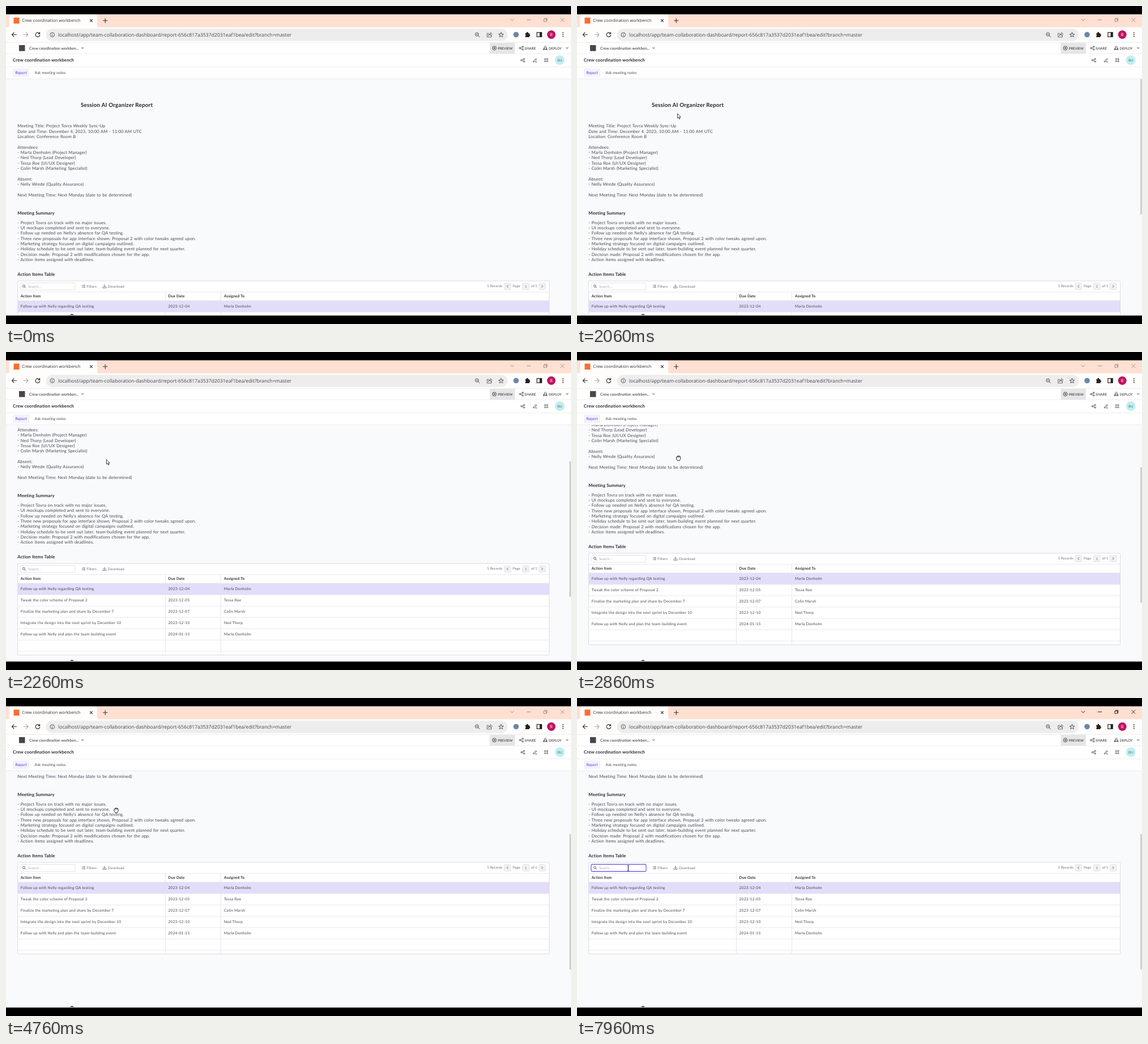
An HTML page that plays this animation: 998 px wide and 561 px high, repeating every 8 s.

```html
<!DOCTYPE html>
<html lang="en">
<head>
<meta charset="utf-8">
<title>Meeting report</title>
<style>
  html, body { margin: 0; width: 100%; height: 100%; overflow: hidden; background: #000; }
  svg { display: block; width: 998px; height: 561px; }
  text { font-family: Lato, sans-serif; fill: #4a4952; text-rendering: geometricPrecision; white-space: pre; }
  .ui { font: 7.4px "Open Sans", sans-serif; fill: #333; }
  .url { font: 8.66px "Open Sans", sans-serif; fill: #45464a; }
  .body { font-size: 7.6px; letter-spacing: .1px; word-spacing: .5px; }
  .title { font-size: 9.9px; font-weight: 700; letter-spacing: .17px; fill: #27252c; }
  .head { font-size: 7.8px; font-weight: 700; letter-spacing: .13px; fill: #2c2a32; }
  .cell { font-size: 6.7px; letter-spacing: .2px; }
  .col { font-size: 6.7px; font-weight: 700; letter-spacing: .1px; fill: #35333b; }
  .tab { font-size: 6.7px; letter-spacing: .04px; }
  .small { font-size: 6.1px; letter-spacing: .06px; fill: #716e76; }
  .btn { font-size: 5.9px; font-weight: 500; letter-spacing: .06px; fill: #333; }
  .line { fill: none; stroke: #444; stroke-width: 1; stroke-linecap: round; stroke-linejoin: round; }
</style>
</head>
<body>
<script>
const NS = 'http://www.w3.org/2000/svg';
const LOOP = 8000, FRAME = 100 / 3;

function add(parent, tag, attrs, content) {
  const node = document.createElementNS(NS, tag);
  for (const key in attrs) node.setAttribute(key, attrs[key]);
  if (content !== undefined) node.textContent = content;
  parent.append(node);
  return node;
}
const rect = (p, x, y, width, height, fill, more) => add(p, 'rect', { x, y, width, height, fill, ...more });
const disc = (p, cx, cy, r, fill, more) => add(p, 'circle', { cx, cy, r, fill, ...more });
const label = (p, x, y, cls, str, more) => add(p, 'text', { x, y, class: cls, ...more }, str);
const icon = (p, x, y, d, stroke = '#444', width = 1, more) =>
  add(p, 'path', { d, class: 'line', transform: `translate(${x} ${y})`, style: `stroke:${stroke};stroke-width:${width}`, ...more });

const svg = add(document.body, 'svg', { viewBox: '0 0 998 561' });
rect(svg, 0, 0, 998, 561, '#000');
rect(svg, 0, 120, 998, 426, '#f8fafc');

// Scrolling page
const clip = add(add(svg, 'defs', {}), 'clipPath', { id: 'view' });
rect(clip, 0, 128, 998, 417);
const view = add(svg, 'g', { 'clip-path': 'url(#view)' });
const page = add(view, 'g', {});

const lines = (x, y, list) => list.forEach((str, i) => str && label(page, x, y + i * 9.35, 'body', str));

label(page, 132, 178.4, 'title', 'Session AI Organizer Report');
lines(20.3, 214.3, [
  'Meeting Title: Project Tovra Weekly Sync-Up',
  'Date and Time: December 4, 2023, 10:00 AM - 11:00 AM UTC',
  'Location: Conference Room B', '',
  'Attendees:',
  '- Marla Denholm (Project Manager)',
  '- Ned Thorp (Lead Developer)',
  '- Tessa Roe (UI/UX Designer)',
  '- Colin Marsh (Marketing Specialist)', '',
  'Absent:',
  '- Nelly Wrede (Quality Assurance)', '',
  'Next Meeting Time: Next Monday (date to be determined)'
]);
label(page, 20.3, 368.1, 'head', 'Meeting Summary');
lines(20.3, 384.7, [
  '- Project Tovra on track with no major issues.',
  '- UI mockups completed and sent to everyone.',
  "- Follow up needed on Nelly's absence for QA testing.",
  '- Three new proposals for app interface shown, Proposal 2 with color tweaks agreed upon.',
  '- Marketing strategy focused on digital campaigns outlined.',
  '- Holiday schedule to be sent out later, team-building event planned for next quarter.',
  '- Decision made: Proposal 2 with modifications chosen for the app.',
  '- Action items assigned with deadlines.'
]);
label(page, 20.3, 475.7, 'head', 'Action Items Table');

// Table
const EDGE = '#e4e4ea';
rect(page, 20.5, 485, 939, 161.5, '#fff', { rx: 1.5, stroke: '#dcdce2' });
rect(page, 21, 520, 938, 20, '#e2ddf9');
for (const y of [504.5, 519.8, 540, 560, 580, 600, 620, 640]) rect(page, 21, y - .4, 938, .8, EDGE);
for (const x of [281, 379]) rect(page, x, 504.5, .9, 141.5, EDGE);
const row = (y, cls, cells) => cells.forEach((str, i) => label(page, [25.7, 286.5, 385][i], y, cls, str));
row(514.3, 'col', ['Action Item', 'Due Date', 'Assigned To']);
[
  ['Follow up with Nelly regarding QA testing', '2023-12-04', 'Marla Denholm'],
  ['Tweak the color scheme of Proposal 2', '2023-12-05', 'Tessa Roe'],
  ['Finalize the marketing plan and share by December 7', '2023-12-07', 'Colin Marsh'],
  ['Integrate the design into the next sprint by December 10', '2023-12-10', 'Ned Thorp'],
  ['Follow up with Nelly and plan the team-building event', '2024-01-15', 'Marla Denholm']
].forEach((cells, i) => row(531.8 + i * 20, 'cell', cells));

const field = rect(page, 25, 488.5, 97, 12.5, '#fff', { rx: 1.5 });
disc(page, 31.5, 494, 2, 'none', { stroke: '#55535c', 'stroke-width': .9 });
icon(page, 33, 495.6, 'M0 0L1.6 1.6', '#55535c', .9);
label(page, 39, 496.7, 'small', 'Search...', { style: 'fill:#a9a7b0' });
const caret = rect(page, 39, 490, .9, 9, '#333');
icon(page, 134.5, 494.5, 'M0-2H.6M2-2H5M0 0H.6M2 0H5M0 2H.6M2 2H5', '#716e76', .9);
label(page, 142.3, 496.9, 'small', 'Filters', { style: 'font-size:6.4px' });
icon(page, 174, 494.5, 'M0-3V1M-2-.8L0 1.2L2-.8M-3 1.2V2.8H3V1.2', '#716e76', .9);
label(page, 180, 496.9, 'small', 'Download', { style: 'font-size:6.3px' });
label(page, 849.7, 496.2, 'small', '5 Records');
label(page, 895, 496.2, 'small', 'Page');
label(page, 927.7, 496.2, 'small', 'of 1');
for (const x of [880, 912.5, 941.5]) rect(page, x, 488.8, 11.5, 11.5, '#f2f2f5', { rx: 1.5, stroke: '#dfdfe5', 'stroke-width': .8 });
label(page, 916.6, 496.7, 'small', '1');
icon(page, 885.7, 494.5, 'M1-2L-1 0L1 2', '#55535c', .9);
icon(page, 947.2, 494.5, 'M-1-2L1 0L-1 2', '#55535c', .9);

const thumb = rect(svg, 995, 129, 3, 239, '#cfd0d6');
rect(svg, 0, 544.7, 998, 1.5, '#dce8f1');
add(svg, 'path', { d: 'M113 545Q116.5 541.4 120 545Z', fill: '#1b1b1f' });

// Browser tab strip
rect(svg, 0, 14.6, 998, 24, '#fee0d3');
add(svg, 'path', { d: 'M2 38Q5.5 38 5.5 34V19Q5.5 15 9.5 15H157Q161 15 161 19V34Q161 38 165 38Z', fill: '#fffdfc' });
rect(svg, 13.5, 20.5, 10, 10.5, '#ff6d2d');
label(svg, 28.3, 28.4, 'ui', 'Crew coordination workbench');
icon(svg, 150.5, 25.7, 'M-2-2L2 2M2-2L-2 2', '#333', 1.1);
icon(svg, 175.3, 25.7, 'M-3.7 0H3.7M0-3.7V3.7', '#333', 1.1);
const winIcons = [
  icon(svg, 894, 24.5, 'M-3-1.5L0 1.5L3-1.5'),
  icon(svg, 923.5, 24.5, 'M-3.2 0H3.2'),
  icon(svg, 953, 24.5, 'M-2.8-1.5H1.5V2.8H-2.8ZM-1.3-1.8V-2.8H2.8V1.5H1.8'),
  icon(svg, 982.8, 24.5, 'M-3-3L3 3M3-3L-3 3')
];

// Address bar
rect(svg, 0, 37.5, 998, 27.5, '#fffdfc');
rect(svg, 70.5, 40.3, 815.5, 21.4, '#eeedee', { rx: 10.7 });
icon(svg, 14.5, 50.5, 'M4 0H-4M-.5-3.7L-4 0L-.5 3.7', '#333', 1.2);
icon(svg, 35, 50.5, 'M-4 0H4M.5-3.7L4 0L.5 3.7', '#aaa', 1.2);
icon(svg, 56, 50.5, 'M3.2-1.9A3.8 3.8 0 1 0 3.7 1M3.6-4V-1.4H1', '#333', 1.2);
disc(svg, 81.8, 50.7, 3.8, 'none', { stroke: '#555' });
icon(svg, 81.8, 50.7, 'M0 0V1.8M0-1.8V-1.7', '#555', 1);
label(svg, 92, 54, 'url', 'localhost/app/team-collaboration-dashboard/report-656c817a3537d2031eaf1bea/edit?branch=master');
disc(svg, 831.8, 50, 3, 'none', { stroke: '#555' });
icon(svg, 834, 52.2, 'M0 0L2.6 2.6M-3.6-2.2H-.8', '#555', 1);
icon(svg, 854, 50.8, 'M-1.5-2.5H-4.2V4H3.5V1.5M-2 1Q-1.5-2 2-2V-4L4.8-1.2L2 1.4V-.3Q-.5-.4-2 1Z', '#555', .9);
const star = Array.from({ length: 10 }, (_, i) => {
  const r = i % 2 ? 1.9 : 4.6, a = i * Math.PI / 5;
  return (r * Math.sin(a)).toFixed(2) + ' ' + (-r * Math.cos(a)).toFixed(2);
});
icon(svg, 874.5, 51, 'M' + star.join('L') + 'Z', '#444', .9);
disc(svg, 901, 50.5, 4.8, '#6b87a8');
add(svg, 'path', { d: 'M917.3 48H919.3A1.6 1.6 0 1 1 922.3 48H924.5V50A1.5 1.5 0 1 1 924.5 53V55H917.3V52.8A1.4 1.4 0 0 0 917.3 50.2Z', fill: '#222' });
rect(svg, 937.8, 46.7, 8.4, 7.6, 'none', { stroke: '#222', 'stroke-width': 1.2 });
rect(svg, 942.6, 46.7, 3.6, 7.6, '#222');
disc(svg, 963.2, 50.5, 7.4, '#c2105f');
label(svg, 963.2, 53.1, 'ui', 'B', { 'text-anchor': 'middle', style: 'fill:#fff' });
for (const y of [47.2, 50.5, 53.8]) disc(svg, 983.8, y, 1, '#333');

// App bars
rect(svg, 0, 64.5, 998, 63.5, '#fff');
for (const y of [64.2, 83.8, 107, 128]) rect(svg, 0, y, 998, .8, '#e9e9ec');
rect(svg, 23, 69, 10.5, 10.5, '#4a4648');
label(svg, 41, 77, 'tab', 'Crew coordination workben...', { style: 'fill:#333;font-weight:500' });
icon(svg, 135.3, 74.2, 'M-1.7-.9L0 .9L1.7-.9');
rect(svg, 854.5, 65, 44.5, 19, '#e6e6e8');
disc(svg, 862.6, 74.3, 3.4, 'none', { stroke: '#333', 'stroke-width': .9 });
add(svg, 'path', { d: 'M861.6 72.5L864.7 74.3L861.6 76.1Z', fill: '#333' });
label(svg, 868.7, 76.5, 'btn', 'PREVIEW');
label(svg, 916, 76.5, 'btn', 'SHARE', { style: 'font-size:6.2px' });
label(svg, 958.7, 76.5, 'btn', 'DEPLOY');

function shareIcon(x, y, s) {
  const g = add(svg, 'g', { transform: `translate(${x} ${y}) scale(${s})` });
  icon(g, 0, 0, 'M2.6-2.4L-2.6 0L2.6 2.4', '#444', .9);
  for (const [cx, cy] of [[-2.6, 0], [2.6, -2.4], [2.6, 2.4]]) disc(g, cx, cy, 1.2, '#fff', { stroke: '#444', 'stroke-width': .9 });
}
shareIcon(910.3, 74.3, 1);
icon(svg, 952.5, 74.3, 'M-1.8 1.8V-1.2Q-1.5-3 0-3.8Q1.5-3 1.8-1.2V1.8ZM-1.8 0L-3.2 1.6V3.2L-1.8 2.2M1.8 0L3.2 1.6V3.2L1.8 2.2M0-.9V-.8', '#333', .9);
icon(svg, 991.2, 74.2, 'M-1.7-.9L0 .9L1.7-.9');

label(svg, 12, 98, 'head', 'Crew coordination workbench');
shareIcon(912.8, 95.7, .95);
icon(svg, 934.5, 95.5, 'M-2.6 1.6L1.4-2.8L2.9-1.4L-1.1 2.9L-3 3.1ZM.5 3.3H3.2', '#444', .9);
for (const dx of [-1.9, 1.9]) for (const dy of [-1.9, 1.9])
  disc(svg, 954.2 + dx, 95.6 + dy, 1.1, 'none', { stroke: '#444', 'stroke-width': .9 });
disc(svg, 978.2, 95.5, 8.5, '#c3eeee');
label(svg, 978.2, 97.7, 'small', 'BU', { 'text-anchor': 'middle', style: 'fill:#44777c' });
rect(svg, 12, 110.3, 29.3, 14.6, '#f3f1fd', { rx: 1.5 });
label(svg, 16.5, 119.9, 'tab', 'Report', { style: 'fill:#553de9' });
label(svg, 50.6, 119.9, 'tab', 'Ask meeting notes');

// Mouse cursors, drawn around their hot spots
const cursor = add(svg, 'g', {});
const shape = (d, fill = '#fff', width = .9) =>
  add(cursor, 'path', { d, fill, stroke: '#111', 'stroke-width': width, 'stroke-linejoin': 'round' });
const shapes = {
  arrow: shape('M0 0V8.2L1.9 6.5L3.2 9.5L4.6 8.9L3.3 6H5.8Z', '#fff', .8),
  point: shape('M-1 .8Q0-.5 1 .8V3.6L4.6 4.6Q5.2 4.8 5 6L4.3 9.6H-.6L-3.4 6Q-3.2 4.9-1.9 5.4L-1 6.2Z'),
  grab: shape('M-3.8-.6Q-3.4-1.6-2.4-.8L-2.6-2.4Q-2-3.8-1.2-2.9Q-.6-4.8.4-3.4Q1.4-4.4 2-2.9Q3.6-3.6 3.6-1.6V1Q3.4 3 2.2 4.6H-1.6Q-3.6 2-3.8-.6ZM-1.2-2.9V-1.2M.4-3.4V-1.2M2-2.9V-1.2'),
  beam: shape('M-1.6-4.6Q0-4.6 0-3.6Q0-4.6 1.6-4.6M0-3.6V3.8M-1.6 4.8Q0 4.8 0 3.8Q0 4.8 1.6 4.8', 'none', 1)
};

// [time, value...]
const scrollKeys = [[2100, 0], [2133, 14], [2167, 42], [2200, 70], [2233, 94], [2267, 112], [2300, 125], [2333, 130],
  [4267, 130], [4300, 145.5], [4333, 167], [4367, 184], [4400, 195]];
const moveKeys = [[433, 985, 268], [500, 795, 237], [567, 573, 200], [633, 430, 189], [733, 276, 186], [860, 234, 182],
  [1130, 242, 179], [1260, 242, 179], [1500, 190, 174.5], [1700, 132, 178], [1860, 141, 184], [2060, 177.5, 189.8],
  [2400, 177.5, 189.8], [2433, 179, 187], [4633, 179, 187], [4767, 194.5, 197.8], [4880, 199, 214],
  [5080, 168, 256], [5280, 116, 291], [5460, 94, 299.5], [5560, 90.5, 300]];
const kinds = [[0, 'arrow'], [760, 'point'], [1850, 'arrow'], [2420, 'grab'], [5090, 'arrow'], [5290, 'beam']];

function sample(keys, t, i) {
  const n = keys.findIndex(k => k[0] > t);
  if (n === 0) return keys[0][i];
  if (n < 0) return keys[keys.length - 1][i];
  const a = keys[n - 1], b = keys[n];
  return a[i] + (b[i] - a[i]) * (t - a[0]) / (b[0] - a[0]);
}

function draw(now) {
  const t = Math.floor((now % LOOP + 7) / FRAME) * FRAME;
  const top = sample(scrollKeys, t, 1);
  page.setAttribute('transform', `translate(0 ${-top})`);
  thumb.setAttribute('y', 129 + top * .57);

  const present = t > 430;
  thumb.style.display = cursor.style.display = present ? '' : 'none';
  cursor.setAttribute('transform', `translate(${sample(moveKeys, t, 1)} ${sample(moveKeys, t, 2)})`);
  const kind = kinds.filter(k => k[0] <= t).pop()[1];
  for (const name in shapes) shapes[name].style.display = name === kind ? '' : 'none';

  const focused = t > 6230;
  field.setAttribute('stroke', focused ? '#7462ea' : t > 5290 ? '#c6c5cf' : '#e0e0e6');
  field.setAttribute('stroke-width', focused ? 1.3 : .9);
  for (const w of winIcons) w.style.stroke = focused ? '#2a2625' : '#a38f88';
  const blink = [6230, 6560, 6900, 7260, 7630, 7960].filter(k => t + 7 > k).length;
  caret.style.display = blink % 2 ? '' : 'none';
}

function tick() {
  draw(performance.now());
  requestAnimationFrame(tick);
}
tick();
</script>
</body>
</html>
```
